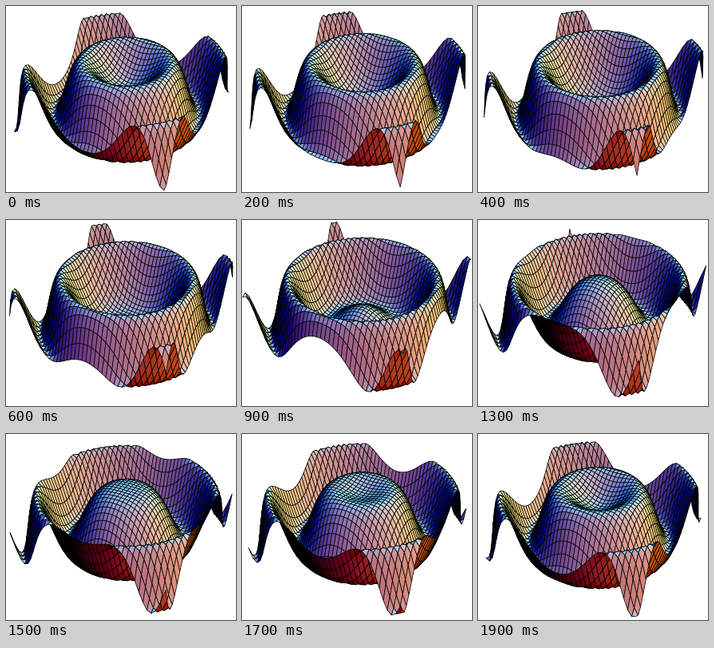
A matplotlib script that plays this animation: 288 by 233 pixels, repeating every 2000 ms.

```python
import numpy as np
import matplotlib.pyplot as plt
from matplotlib.animation import FuncAnimation
from matplotlib.collections import PolyCollection

W, H, DPI = 288, 233, 64
STEPS, INTERVAL = 20, 100
POINTS = 40
REACH = 0.75 * np.pi          # half side of the square domain
HEIGHT = 0.19                 # wave amplitude in box units
SCALE, CX, CY = 690.3, 150.8, 101.4
FLATTEN = 2.0                 # depth compression used when lighting
LINE = 0.75                   # mesh line width in pixels


def unit(v):
    v = np.asarray(v, float)
    return v / np.linalg.norm(v, axis=-1, keepdims=True)


EYE = np.array([1.3, -2.4, 2.0])
DIST = np.linalg.norm(EYE)
VIEW = unit(EYE)
RIGHT = unit(np.cross([0, 0, 1], EYE))
UP = np.cross(VIEW, RIGHT)
CAMERA = np.stack([RIGHT, UP, VIEW])

# red, green and blue lamps in camera coordinates
LAMPS = unit([[1, 0, 1], [1, 1, 1], [0, 1, 1]])

# x runs toward the eye; y is reversed so that cells go far to near
side = np.linspace(-0.5, 0.5, POINTS)
X, Y = np.meshgrid(side, side[::-1], indexing="ij")
R2 = (2 * REACH) ** 2 * (X ** 2 + Y ** 2)


def cells(a):
    """The four corners of every cell, in drawing order."""
    quad = np.stack([a[:-1, :-1], a[1:, :-1], a[1:, 1:], a[:-1, 1:]], axis=2)
    return quad.reshape(-1, 4, a.shape[-1])


def project(p):
    cam = p @ CAMERA.T
    depth = DIST - cam[..., 2]
    return np.stack([CX + SCALE * cam[..., 0] / depth,
                     CY - SCALE * cam[..., 1] / depth], axis=-1)


def shade(quads):
    """Lambert light on normals taken after the perspective transform."""
    normal = unit(np.cross(quads[:, 2] - quads[:, 0], quads[:, 3] - quads[:, 1]))
    facing = np.sum(normal * (EYE - quads.mean(axis=1)), axis=1) / DIST
    cam = normal @ CAMERA.T
    cam[:, 2] = FLATTEN * facing
    cam[facing < 0] *= -1
    return np.clip(unit(cam) @ LAMPS.T, 0, 1)


def surface(step):
    z = HEIGHT * np.sin(R2 - 2 * np.pi * step / STEPS)
    quads = cells(np.stack([X, Y, z], axis=-1))
    return project(quads), shade(quads)


fig = plt.figure(figsize=(W / DPI, H / DPI), dpi=DPI, facecolor="white")
ax = fig.add_axes([0, 0, 1, 1])
ax.set_xlim(0, W)
ax.set_ylim(H, 0)
ax.axis("off")

verts, colors = surface(0)
mesh = PolyCollection(verts, facecolors=colors, edgecolors="black",
                      linewidths=LINE * 72 / DPI, joinstyle="round")
ax.add_collection(mesh, autolim=False)


def draw(step):
    verts, colors = surface(step)
    mesh.set_verts(verts)
    mesh.set_facecolor(colors)
    return mesh,


anim = FuncAnimation(fig, draw, frames=STEPS, interval=INTERVAL,
                     init_func=lambda: draw(0), repeat=True, repeat_delay=0)
plt.show()
```
